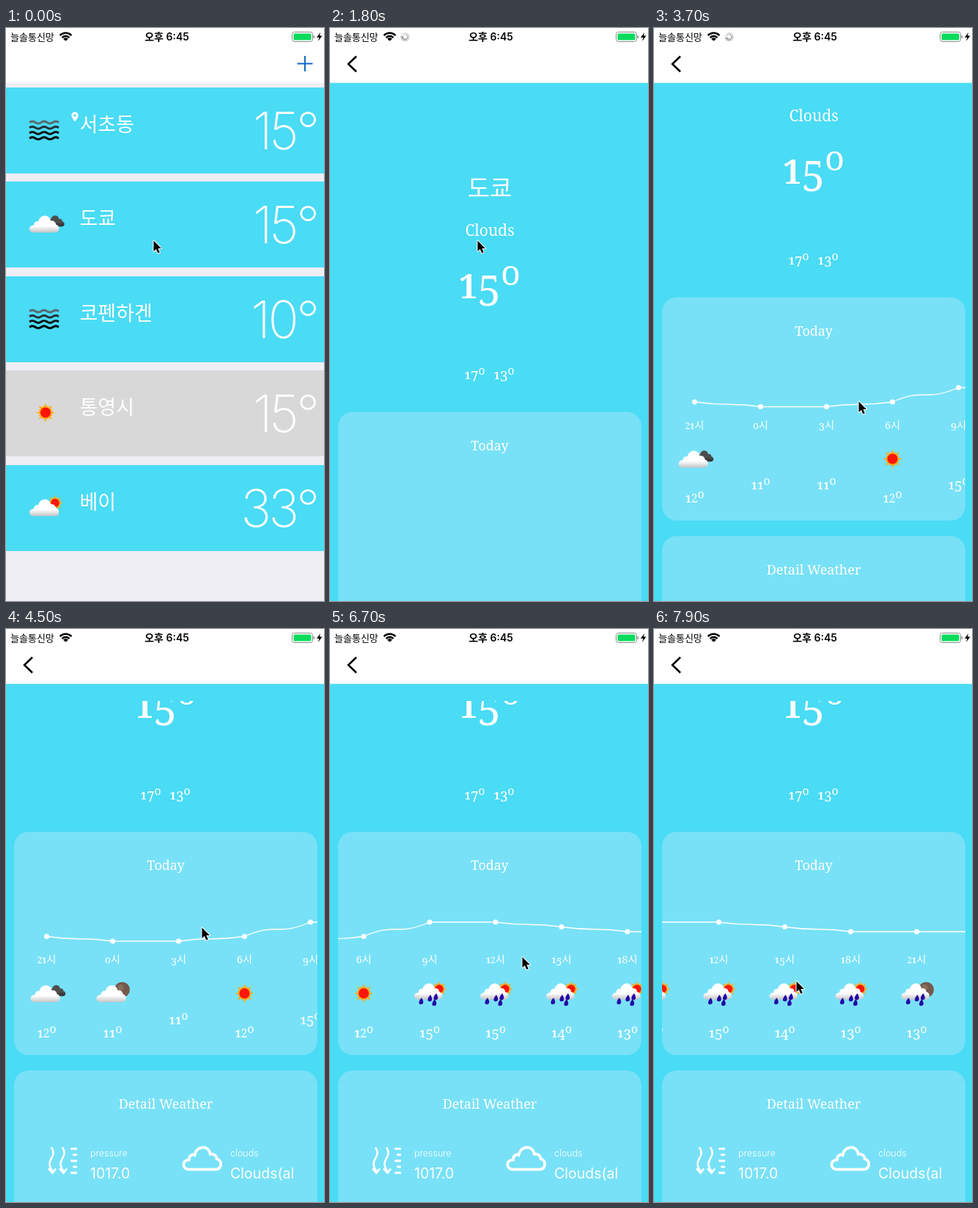
Recreate the animation shown at these times as an HTML page with a canvas. Size 434 by 780 pixels, loop 8000 ms.

```html
<!DOCTYPE html>
<html lang="ko">
<head>
<meta charset="utf-8">
<title>Weather</title>
<style>
html, body { margin: 0; width: 100%; height: 100%; overflow: hidden; background: #fff; }
canvas { display: block; width: 434px; height: 780px; }
</style>
</head>
<body>
<canvas id="stage" width="434" height="780"></canvas>
<script>
const ctx = document.getElementById('stage').getContext('2d');
const W = 434, H = 780, NAV = 74.5, LOOP = 8000, STEP = 100;
const BLUE = '#4adbf5', PANEL = '#78e1f7';
const KOREAN = '"Noto Sans CJK KR", "Noto Sans CJK", sans-serif';
const SANS = 'Inter, Roboto, ' + KOREAN, SERIF = '"Noto Serif", ' + KOREAN;

const cities = [
  ['서초동', '15°', 'mist'], ['도쿄', '15°', 'clouds'], ['코펜하겐', '10°', 'mist'],
  ['통영시', '15°', 'sun'], ['베이', '33°', 'sunCloud']
];
// hour, temperature, icon, moment the icon arrives
const hours = [
  [21, 12, 'clouds', 2700], [0, 11, 'moonCloud', 4100], [3, 11, 'moonCloud', 4800],
  [6, 12, 'sun', 3300], [9, 15, 'sunRain', 5000], [12, 15, 'sunRain', 5000],
  [15, 14, 'sunRain', 5100], [18, 13, 'sunRain', 5100], [21, 13, 'moonRain', 5200]
];
// time, x, y
const cursorPath = [
  [0, 201, 289], [1800, 201, 289], [2600, 284, 664], [3700, 279, 508], [4500, 267, 406],
  [5300, 287, 455], [6000, 169, 453], [6200, 112, 453], [6700, 262, 446], [7100, 326, 452], [7900, 194, 479]
];
const scrollPath = [[2600, 0], [3700, 156], [4300, 246.5]];
const swipePath = [[5300, 0], [6000, 118], [6250, 205], [6700, 279.5], [7100, 285], [7900, 417]];

function along(path, t, field = 1) {
  if (t <= path[0][0]) return path[0][field];
  for (let i = 1; i < path.length; i++) {
    const a = path[i - 1], b = path[i];
    if (t <= b[0]) return a[field] + (b[field] - a[field]) * (t - a[0]) / (b[0] - a[0]);
  }
  return path[path.length - 1][field];
}

function at(x, y, draw) {
  ctx.save();
  ctx.translate(x, y);
  draw();
  ctx.restore();
}

function text(str, x, y, font, color = '#fff', align = 'left') {
  ctx.font = font;
  ctx.fillStyle = color;
  ctx.textAlign = align;
  ctx.fillText(str, x, y);
}

function polyline(points, color, width) {
  ctx.beginPath();
  points.forEach(([x, y]) => ctx.lineTo(x, y));
  ctx.strokeStyle = color;
  ctx.lineWidth = width;
  ctx.stroke();
}

function disc(x, y, r, color) {
  ctx.beginPath();
  ctx.arc(x, y, r, 0, 7);
  ctx.fillStyle = color;
  ctx.fill();
}

function roundRect(x, y, w, h, r, color) {
  ctx.beginPath();
  ctx.roundRect(x, y, w, h, r);
  ctx.fillStyle = color;
  ctx.fill();
}

// Old-style figures: glyph, scale, drop (both in em) and weight
function figure(ch) {
  if (ch === 'º') return ['o', .78, -.3, 400];
  if (ch === '0') return ['o', .9, 0, 400];
  if (ch === '1') return ['1', .75, 0, 600];
  if (ch === '2') return ['2', .78, 0, 500];
  if ('34579'.includes(ch)) return [ch, .95, .17, 400];
  return [ch, .95, 0, 400];
}

function oldStyle(str, center, y, size) {
  const glyphs = [...str].map(ch => {
    const [glyph, scale, drop, weight] = figure(ch);
    const font = `${weight} ${size * scale}px ${SERIF}`;
    ctx.font = font;
    return { glyph, font, drop: drop * size, width: ctx.measureText(glyph).width };
  });
  let x = center - glyphs.reduce((sum, g) => sum + g.width, 0) / 2;
  for (const g of glyphs) {
    text(g.glyph, x, y + g.drop, g.font);
    x += g.width;
  }
}

function cloudPath() {
  ctx.beginPath();
  ctx.moveTo(-14, 12);
  ctx.bezierCurveTo(-22, 12, -22, 2, -14, 2);
  ctx.bezierCurveTo(-14, -3, -10, -4, -8, -3);
  ctx.bezierCurveTo(-6, -13, 7, -14, 9, -4);
  ctx.bezierCurveTo(14, -5, 16, -1, 16, 1);
  ctx.bezierCurveTo(22, 2, 22, 12, 15, 12);
  ctx.closePath();
}

function cloud(x, y, scale, top, bottom) {
  at(x, y, () => {
    ctx.scale(scale, scale);
    cloudPath();
    const shade = ctx.createLinearGradient(0, -12, 0, 13);
    shade.addColorStop(.6, top);
    shade.addColorStop(1, bottom);
    ctx.fillStyle = shade;
    ctx.fill();
  });
}

function sun(x, y, r) {
  ctx.beginPath();
  for (let i = 0; i < 32; i++) {
    const a = i * Math.PI / 16, d = i % 2 ? r * .6 : r * (i % 4 ? .76 : 1);
    ctx.lineTo(x + d * Math.sin(a), y - d * Math.cos(a));
  }
  ctx.fillStyle = '#ffab13';
  ctx.fill();
  disc(x, y, r * .52, '#fb1607');
}

function mist() {
  for (let row = 0; row < 4; row++) {
    const y = -10 + row * 7.2, points = [];
    for (let x = -20; x <= 20; x++) points.push([x, y - 1.4 * Math.sin((x + 20) * Math.PI / 8)]);
    polyline(points, ['#596c72', '#26343a', '#10181b', '#020304'][row], 3);
  }
}

function drop(x, y) {
  ctx.beginPath();
  ctx.moveTo(x + 1, y - 5);
  ctx.bezierCurveTo(x + 5, y + 1, x + 3, y + 4, x, y + 4);
  ctx.bezierCurveTo(x - 4, y + 4, x - 3, y - 1, x + 1, y - 5);
  ctx.fillStyle = '#2507a5';
  ctx.fill();
}

function icon(kind, x, y) {
  at(x, y, () => {
    if (kind === 'mist') return mist();
    if (kind === 'sun') return sun(0, 0, 13.5);
    const rain = kind.endsWith('Rain');
    if (kind === 'clouds') cloud(12.5, -4, .65, '#4d4d4d', '#292929');
    if (kind.startsWith('sun')) sun(13, -6, 11);
    if (kind.startsWith('moon')) {
      disc(13, -5, 10.5, '#75594d');
      disc(11, -8, 4, '#8a6f60');
    }
    cloud(-2, rain ? -3 : 0, rain ? .95 : 1, '#fff', '#bcbec0');
    if (rain) [[-12, 11], [0, 7], [8, 5], [6, 13]].forEach(([dx, dy]) => drop(dx, dy));
  });
}

function statusBar(t) {
  text('늘솔통신망', 6, 16.5, `13px ${KOREAN}`, '#000');
  [4.5, 8.8, 13].forEach(r => {
    ctx.beginPath();
    ctx.arc(81.5, 18, r - 1.8, -Math.PI * .75, -Math.PI * .25);
    ctx.strokeStyle = '#000';
    ctx.lineWidth = r < 5 ? 4 : 2.5;
    ctx.stroke();
  });
  text('오후 6:45', 219.5, 17, `600 14px ${SANS}`, '#000', 'center');
  ctx.beginPath();
  ctx.roundRect(390.5, 5.5, 28, 13, 3);
  ctx.strokeStyle = '#8b8b8b';
  ctx.lineWidth = 1;
  ctx.stroke();
  roundRect(392.5, 7.5, 24, 9, 1.5, '#0bdc5c');
  roundRect(419.5, 10, 1.5, 4, 1, '#8b8b8b');
  ctx.beginPath();
  [[429, 6], [424, 13], [427.5, 13], [426, 18], [431.5, 10.5], [428, 10.5]].forEach(p => ctx.lineTo(...p));
  ctx.fillStyle = '#000';
  ctx.fill();
  if (t >= 1800 && t < 4300) spinner(t);
}

function spinner(t) {
  const turn = Math.floor(t * 12 / 1000) % 12;
  at(102.5, 12, () => {
    for (let i = 0; i < 12; i++) {
      const age = (turn - i + 12) % 12;
      ctx.fillStyle = `rgba(60,60,60,${.8 - age * .055})`;
      ctx.fillRect(-.6, -6, 1.2, 3.4);
      ctx.rotate(Math.PI / 6);
    }
  });
}

function navBar(t, pushed) {
  ctx.fillStyle = '#fff';
  ctx.fillRect(0, 0, W, NAV);
  statusBar(t);
  ctx.globalAlpha = 1 - pushed;
  polyline([[397.5, 48.5], [418.5, 48.5]], '#1168c4', 2);
  polyline([[408, 38], [408, 59]], '#1168c4', 2);
  ctx.globalAlpha = pushed;
  polyline([[36, 38.5], [25, 49], [36, 59.5]], '#000', 2.5);
  ctx.globalAlpha = 1;
}

function pin() {
  ctx.beginPath();
  ctx.arc(94, 119, 4.7, Math.PI * .85, Math.PI * .15);
  ctx.quadraticCurveTo(97, 124, 94, 127.5);
  ctx.quadraticCurveTo(91, 124, 89.8, 121);
  ctx.fillStyle = '#fff';
  ctx.fill();
  disc(94, 119, 1.7, BLUE);
}

function listScreen(t) {
  const selected = t < 100 ? 3 : 1;
  ctx.fillStyle = '#efeef4';
  ctx.fillRect(0, NAV, W, H - NAV);
  cities.forEach(([name, temp, kind], i) => {
    at(0, Math.round(80.5 + i * 128.6), () => {
      ctx.fillStyle = i === selected ? '#d8d8d8' : BLUE;
      ctx.fillRect(0, 0, W, 117);
      icon(kind, kind === 'mist' ? 52 : 54, 57.5);
      text(name, 100.5, 60, `300 27px ${KOREAN}`);
      ctx.letterSpacing = '-3.5px';
      text(temp, 424.5, 84, `200 70px ${SANS}`, '#fff', 'right');
      ctx.letterSpacing = '0px';
    });
  });
  pin();
}

function hourly(t, offset) {
  const spacing = 90, left = 55.5 - offset;
  const points = hours.map(([, temp], i) => [left + i * spacing, 671.5 - 6.5 * (temp - 11)]);
  ctx.save();
  ctx.beginPath();
  ctx.rect(11, 522, 414, 304);
  ctx.clip();
  ctx.beginPath();
  ctx.moveTo(...points[0]);
  for (let i = 1; i < points.length; i++) {
    const [x0, y0] = points[i - 1], [x1, y1] = points[i], mid = (x0 + x1) / 2;
    ctx.bezierCurveTo(mid, y1, mid, y0, x1, y1);
  }
  ctx.lineTo(points[8][0] + spacing, points[8][1]);
  ctx.strokeStyle = '#fff';
  ctx.lineWidth = 1.3;
  ctx.stroke();
  hours.forEach(([hour, temp, kind, ready], i) => {
    const [x, y] = points[i], loaded = t >= ready;
    disc(x, y, 3.5, '#fff');
    oldStyle(hour + '시', x, 701.5, 15);
    if (loaded) icon(kind, x, 742.5);
    oldStyle(temp + 'º', x, loaded ? 802 : 784, 20);
  });
  ctx.restore();
}

function pressureIcon() {
  [62, 77].forEach(x => {
    const points = [];
    for (let y = 0; y <= 34; y++) points.push([x + 2.5 * Math.sin(y / 4.8), 952 + y]);
    polyline(points, '#fff', 2.6);
    polyline([[x - 4, 981], [x + 1.5, 987], [x + 6, 981]], '#fff', 2.6);
  });
  for (let i = 0; i < 5; i++) roundRect(i % 2 ? 91 : 88, 952.5 + i * 8.2, i % 2 ? 6 : 9, 3, 1, '#fff');
}

function details() {
  text('Detail Weather', 218, 899.5, `18px ${SERIF}`, '#fff', 'center');
  pressureIcon();
  at(267.5, 966.5, () => {
    ctx.scale(1.26, 1.3);
    cloudPath();
    ctx.strokeStyle = '#fff';
    ctx.lineWidth = 3;
    ctx.stroke();
  });
  [[115, 'pressure', '1017.0'], [306, 'clouds', 'Clouds(al']].forEach(([x, label, value]) => {
    text(label, x, 964.5, `300 12.5px ${SANS}`);
    text(value, x, 994, `400 19.5px ${SANS}`);
  });
}

function detailScreen(t) {
  const scroll = along(scrollPath, t);
  ctx.fillStyle = BLUE;
  ctx.fillRect(0, NAV, W, H - NAV);
  ctx.save();
  ctx.beginPath();
  ctx.rect(0, 98, W, H - 98);
  ctx.clip();
  ctx.translate(0, -scroll);
  text('도쿄', 218, 229.5, `300 33px ${KOREAN}`, '#fff', 'center');
  text('Clouds', 218, 283, `21px ${SERIF}`, '#fff', 'center');
  oldStyle('15º', 218, 367.5, 60);
  oldStyle('17º', 197.5, 478, 20);
  oldStyle('13º', 237.5, 478, 20);
  roundRect(11, 522.5, 414, 304, 20, PANEL);
  roundRect(11, 847.5, 414, 304, 20, PANEL);
  text('Today', 218, 574.5, `18px ${SERIF}`, '#fff', 'center');
  if (t >= 2300) hourly(t, along(swipePath, t));
  details();
  ctx.restore();
}

function cursor(x, y) {
  at(x, y, () => {
    ctx.beginPath();
    [[0.5, 0.5], [0.5, 15], [3.8, 12], [6.3, 17.5], [8.8, 16.4], [6.4, 11], [11, 11]].forEach(p => ctx.lineTo(...p));
    ctx.closePath();
    ctx.lineJoin = 'round';
    ctx.lineWidth = 2;
    ctx.strokeStyle = '#fff';
    ctx.stroke();
    ctx.fillStyle = '#000';
    ctx.fill();
  });
}

function render(t) {
  const progress = Math.min(1, Math.max(0, (t - 250) / 550));
  const pushed = 1 - (1 - progress) ** 3;
  if (pushed < 1) at(-pushed * W * .3, 0, () => listScreen(t));
  if (pushed > 0) at((1 - pushed) * W, 0, () => detailScreen(t));
  navBar(t, pushed);
  cursor(along(cursorPath, t, 1), along(cursorPath, t, 2));
}

const start = performance.now();
function tick() {
  const t = (performance.now() - start) % LOOP;
  render(Math.floor(t / STEP) * STEP);
  requestAnimationFrame(tick);
}
tick();
</script>
</body>
</html>
```
